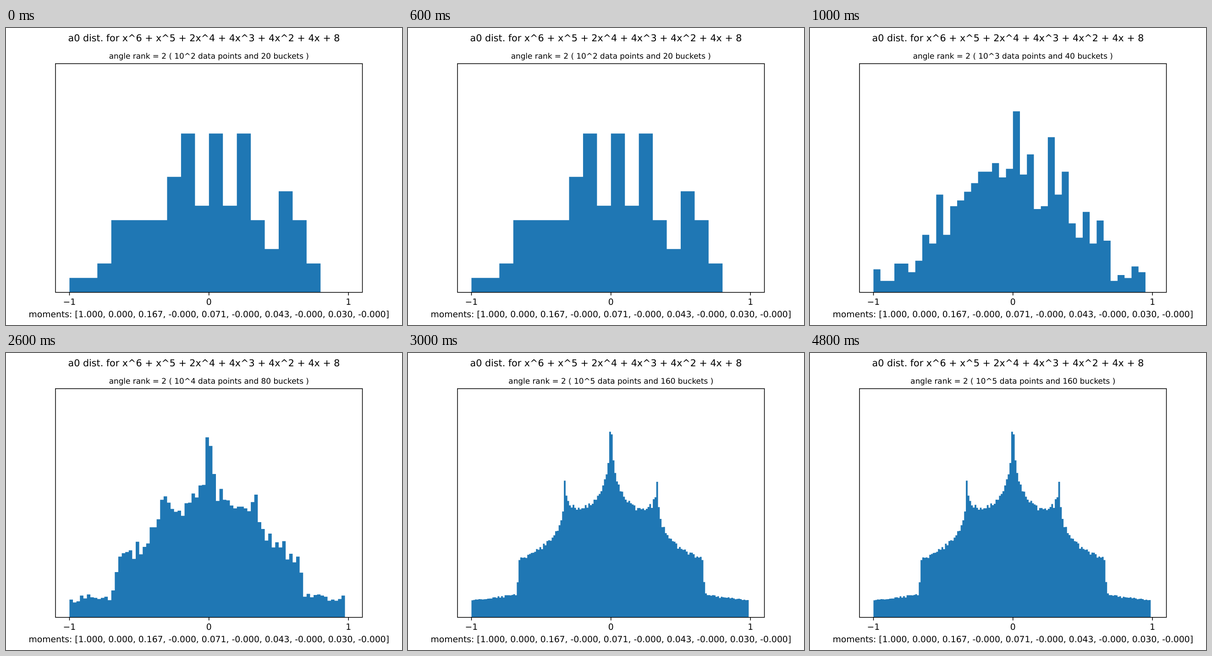
Animation of 864 by 648 pixels, one loop 6000 ms. Source, as an HTML page:

```html
<!DOCTYPE html>
<html lang="en">
<head>
<meta charset="utf-8">
<title>a0 distribution</title>
<style>
  html, body { margin: 0; width: 100%; height: 100%; overflow: hidden; background: #fff; }
  svg { display: block; width: 864px; height: 648px; }
  text {
    font-family: "DejaVu Sans", sans-serif;
    font-size: 18.75px;
    text-anchor: middle;
    text-rendering: geometricPrecision;
  }
  .title { font-size: 20.7px; }
  .sub { font-size: 16.875px; }
  .bars { fill: #1f77b4; }
  .axes { fill: none; stroke: #000; stroke-width: 1.5; }
</style>
</head>
<body>
<svg viewBox="0 0 864 648">
  <text class="title" x="432" y="28.7">a0 dist. for x^6 + x^5 + 2x^4 + 4x^3 + 4x^2 + 4x + 8</text>
  <g id="stages"></g>
  <path class="axes" d="M108 77.8H777.6V576.8H108ZM138.5 576.8v6.6M442.8 576.8v6.6M747.2 576.8v6.6"/>
  <text x="138.4" y="604.3">−1</text>
  <text x="442.8" y="604.3">0</text>
  <text x="747.2" y="604.3">1</text>
  <text x="442.8" y="630.7">moments: [1.000, 0.000, 0.167, -0.000, 0.071, -0.000, 0.043, -0.000, 0.030, -0.000]</text>
</svg>
<script>
const LOOP = 6000;
const STEPS = [
  { power: 2, buckets: 20, start: 0 },
  { power: 3, buckets: 40, start: 1000 },
  { power: 4, buckets: 80, start: 2000 },
  { power: 5, buckets: 160, start: 3000 }
];

const MID = 442.8, BASE = 576.72;
const UNIT_X = 669.6 / 2.2;
const UNIT_Y = 498.96 / 1.6;

// With u = x + 2/x the polynomial becomes u(u^2 + u - 4); its roots give the angles.
const ROOTS = [0, (-1 + Math.sqrt(17)) / 2, (-1 - Math.sqrt(17)) / 2];
const ANGLES = ROOTS.map(u => Math.acos(u / Math.sqrt(8)));

const trace = n => ANGLES.reduce((sum, a) => sum + Math.cos(n * a), 0) / 3;

// Density over [-1, 1) without the last bucket.
function density(points, buckets) {
  const counts = new Array(buckets - 1).fill(0);
  let total = 0;
  for (let n = 1; n <= points; n++) {
    const i = Math.floor((trace(n) + 1) * buckets / 2);
    if (i >= 0 && i < counts.length) {
      counts[i]++;
      total++;
    }
  }
  return counts.map(c => c * buckets / (2 * total));
}

function outline(heights, buckets) {
  const px = i => (MID + UNIT_X * (2 * i / buckets - 1)).toFixed(2);
  const py = h => (BASE - UNIT_Y * h).toFixed(2);
  const tops = heights.map((h, i) => `V${py(h)}H${px(i + 1)}`).join("");
  return `M${px(0)} ${BASE}${tops}V${BASE}Z`;
}

function add(parent, tag, attrs, text = "") {
  const el = document.createElementNS("http://www.w3.org/2000/svg", tag);
  for (const key in attrs) el.setAttribute(key, attrs[key]);
  el.textContent = text;
  return parent.appendChild(el);
}

const groups = STEPS.map(({ power, buckets }) => {
  const g = add(document.getElementById("stages"), "g", {});
  add(g, "text", { class: "sub", x: MID, y: 66.5 },
    `angle rank = 2 ( 10^${power} data points and ${buckets} buckets )`);
  add(g, "path", { class: "bars", d: outline(density(10 ** power, buckets), buckets) });
  return g;
});

// Only the latest step whose start has passed is visible.
const t0 = performance.now();

function draw(now) {
  const t = Math.max(0, now - t0) % LOOP;
  const current = STEPS.findLastIndex(step => t >= step.start);
  groups.forEach((g, i) => g.setAttribute("visibility", i === current ? "visible" : "hidden"));
  requestAnimationFrame(draw);
}
draw(t0);
</script>
</body>
</html>
```
